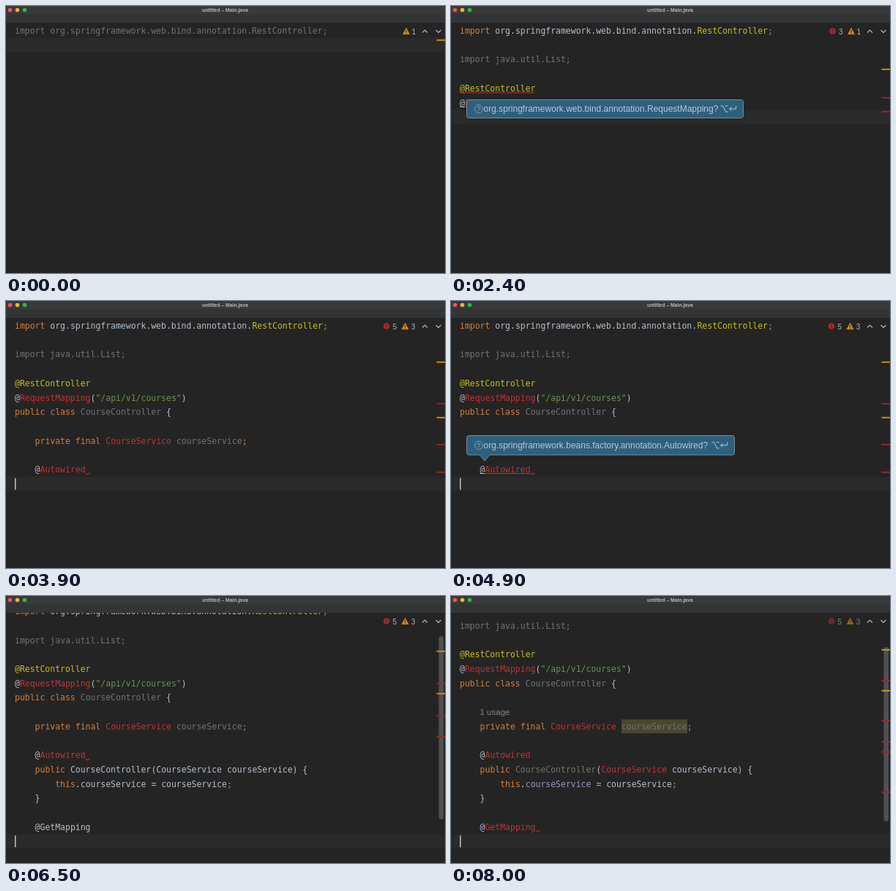
Animation of 600 by 366 pixels, one loop 8.1 s. Source, as an HTML page with a canvas:

```html
<!DOCTYPE html>
<html lang="en">
<head>
<meta charset="utf-8">
<title>Editor</title>
<style>
html, body { margin: 0; height: 100%; overflow: hidden; background: #242424; }
canvas { display: block; width: 600px; height: 366px; }
</style>
</head>
<body>
<canvas id="stage" width="600" height="366"></canvas>
<script>
const ctx = document.getElementById("stage").getContext("2d");
const LOOP = 8100, ROW = 19.7, CHAR = 6.903, LEFT = 12;
const MONO = '11.466px "DejaVu Sans Mono", monospace';
const sans = (size, weight = "") => `${weight} ${size}px "Liberation Sans", Arial, sans-serif`;
const RED = "#c53232", AMBER = "#c98a16", YELLOW = "#b8a022", DARK_RED = "#952a28";
const INK = { w: "#b3bfcc", o: "#d0803c", y: "#c5bf22", g: "#6a9155", r: RED, d: "#737373", p: "#a492bd" };

// Start of each editor state: a paste, then the analysis that follows it.
const STARTS = [0, 700, 1100, 3000, 3600, 6300, 7000, 8000];
const CARET_ROW = [1, 6, 6, 11, 11, 16, 17, 17];
const COUNTS = [[0, 1], [0, 1], [3, 1], [3, 1], [5, 3], [5, 3], [5, 3], [5, 3]];
const MARKS = [
  { a: [46] },
  { a: [86] },
  { a: [86], r: [125, 144] },
  { a: [83], r: [121, 140] },
  { a: [83, 159], r: [140, 196, 234] },
  { a: [75, 133], r: [119, 163, 192] },
  { y: [73, 129], r: [115, 170, 199, 213, 268] }
];
MARKS[7] = MARKS[6];
const MARK_INK = { a: AMBER, y: YELLOW, r: DARK_RED };

// "~" starts a token; the next letter is its colour.
function codeRows(state) {
  const late = (from, then, before = "w") => "~" + (state >= from ? then : before);
  const rows = [state < 2
    ? "~dimport org.springframework.web.bind.annotation.RestController;"
    : "~oimport ~worg.springframework.web.bind.annotation.~yRestController~o;"];
  if (state >= 1) rows.push("", "~dimport java.util.List;", "", "~y@RestController",
    `~w@${late(2, "r")}RequestMapping~w(~g"/api/v1/courses"~w)`);
  if (state >= 3) {
    rows.push(`~opublic class ${late(4, "d")}CourseController ~w{`, "");
    if (state >= 6) rows.push("");
    rows.push(`    ~oprivate final ${late(4, "r")}CourseService ${late(4, "d")}courseService~o;`, "",
      `    ~w@${late(4, "r")}Autowired`);
  }
  if (state >= 5) rows.push(
    `    ~opublic ${late(6, "d")}CourseController~w(${late(6, "r")}CourseService ~wcourseService) {`,
    `        ~othis~w.${late(7, "p")}courseService ~w= courseService~o;`,
    "    ~w}", "", `    ~w@${late(6, "r")}GetMapping`);
  return rows;
}

function text(str, x, y, font, color) {
  ctx.font = font;
  ctx.fillStyle = color;
  ctx.fillText(str, x, y);
}

function rect(x, y, w, h, color) {
  ctx.fillStyle = color;
  ctx.fillRect(x, y, w, h);
}

function disc(x, y, r, color) {
  ctx.fillStyle = color;
  ctx.beginPath();
  ctx.arc(x, y, r, 0, 7);
  ctx.fill();
}

function stroke(path, color, width = 1) {
  ctx.strokeStyle = color;
  ctx.lineWidth = width;
  ctx.stroke(new Path2D(path));
}

function drawCode(str, y) {
  let col = 0;
  str.split("~").forEach((part, i) => {
    const token = i ? part.slice(1) : part;
    text(token, LEFT + col * CHAR, y + 4, MONO, i ? INK[part[0]] : INK.w);
    col += token.length;
  });
}

function squiggle(col, length, y) {
  const x = LEFT + col * CHAR;
  let path = `M${x} ${y + 4.5}`;
  for (let d = 2, down = true; d <= length; d += 2, down = !down) path += `l2 ${down ? 2.6 : -2.6}`;
  stroke(path, RED);
}

function popup(label, y, w, h, pointer) {
  const x = 21.5, b = y + h, r = x + w, mid = y + h / 2;
  const tip = pointer ? `H53L46 ${b + 8}L39 ${b}` : "";
  const shape = `M${x + 3} ${y}H${r - 3}q3 0 3 3V${b - 3}q0 3 -3 3${tip}H${x + 3}q-3 0 -3 -3V${y + 3}q0 -3 3 -3z`;
  ctx.fillStyle = "#2d607d";
  ctx.fill(new Path2D(shape));
  stroke(shape, "#748b97");
  ctx.strokeStyle = "#94a9b5";
  ctx.lineWidth = 0.8;
  ctx.beginPath();
  ctx.arc(38, mid, 5.5, 0, 7);
  ctx.stroke();
  text("?", 35.5, mid + 3.3, sans(9), "#9fb2bc");
  text(label, 44.5, mid + 4, sans(12), "#bac8d0");
  const k = r - 31;
  stroke(`M${k} ${mid - 4}h3l4 8h3M${k + 6} ${mid - 4}h4` +
    `M${k + 21} ${mid - 4}v4h-9m3 -2.5l-3 2.5l3 2.5`, "#bac8d0");
}

function drawStatus(state) {
  const [errors, warnings] = COUNTS[state];
  const shift = state >= 4 ? -1.5 : 0;
  ctx.globalAlpha = state >= 6 ? 0.65 : 1;
  if (errors) {
    disc(521.5 + shift, 34.5, 4.3, "#a32a2a");
    rect(521 + shift, 32, 1, 3, "#262626");
    rect(521 + shift, 36, 1, 1, "#262626");
    text(errors, 530 + shift, 38.5, sans(10), "#b5b5b5");
  }
  ctx.fillStyle = AMBER;
  ctx.fill(new Path2D(`M${547 + shift} 29.5l5 9.5h-10z`));
  rect(546.5 + shift, 33, 1, 3, "#262626");
  rect(546.5 + shift, 37, 1, 1, "#262626");
  text(warnings, 554.5 + shift / 2, 38.5, sans(10), "#b5b5b5");
  ctx.globalAlpha = 1;
  stroke("M569 36.5l3.5 -3.5l3.5 3.5M587.5 33l3.5 3.5l3.5 -3.5", "#b8b8b8", 1.2);
}

function drawTitleBar() {
  rect(0, 0, 600, 23, "#323436");
  rect(0, 0, 600, 11, "#38393b");
  ["#f2544d", "#f0b52e", "#2bbd3f"].forEach((color, i) => disc(5.5 + i * 10, 5.5, 2.8, color));
  text("untitled – Main.java", 268, 8, sans(6.8, "bold"), "#b9b9b9");
}

function draw(t) {
  const state = STARTS.findLastIndex(start => t >= start);
  const ease = 1 - (1 - Math.min(1, Math.max(0, (t - 6300) / 200))) ** 3;
  const scroll = 12.9 * ease + (state >= 6 ? ROW : 0);
  const rowY = i => 34 + ROW * i - scroll;
  const caretY = rowY(CARET_ROW[state]);

  rect(0, 0, 600, 366, "#242424");
  rect(0, caretY - 10, 600, ROW, "#2a2a2a");
  if (state === 7) rect(233, rowY(9) - 9.5, 90, 19, "#4a4630");
  codeRows(state).forEach((row, i) => drawCode(row, rowY(i)));
  if (state >= 6) text("1 usage", 39.5, rowY(8) + 4, sans(11.5), "#858585");

  if (state === 2 || state === 3) {
    squiggle(0, 103, rowY(4));
    squiggle(34, 6, rowY(5));
  }
  if (state === 4 || state === 5) squiggle(14, 6, rowY(10));
  if (state >= 6) squiggle(15, 6, rowY(16));
  if (t >= 1300 && t < 3000) {
    rect(12, rowY(5) + 5, 7, 1, INK.w);
    rect(19, rowY(5) + 5, 97, 1, RED);
  }
  const hint2 = t >= 4300 && t < 5700;
  if (hint2) {
    rect(39.5, rowY(10) + 5, 7, 1, INK.w);
    rect(46.5, rowY(10) + 5, 62, 1, RED);
  }
  if ((t >= 700 && t < 1900) || t >= 3000) rect(12, caretY - 8, 1.5, 16, "#c3c3c3");

  if (state >= 5) {
    ctx.fillStyle = "#505050";
    ctx.beginPath();
    ctx.roundRect(591.5, state >= 6 ? 70 : 55, 6.5, state >= 6 ? 239 : 251, 3);
    ctx.fill();
  }
  for (const [key, ys] of Object.entries(MARKS[state]))
    for (const y of ys) rect(588.5, y - 0.2, 11.5, 2, MARK_INK[key]);

  if (t >= 1600 && t < 3000)
    popup("org.springframework.web.bind.annotation.RequestMapping?", 128.5, 378, 25);
  if (hint2)
    popup("org.springframework.beans.factory.annotation.Autowired?", 184.5, 366, 26.5, true);

  drawStatus(state);
  drawTitleBar();
  const mouse = t >= 1200 && t < 1700 ? [349, 250.5] : t >= 3000 && t < 3500 ? [318.5, 235] : null;
  if (mouse) stroke(`M${mouse[0]} ${mouse[1] - 3}v6m-1.5 .5h3m-3 -7h3`, "#a8a8a8", 0.9);
}

function tick() {
  draw(performance.now() % LOOP);
  requestAnimationFrame(tick);
}
tick();
</script>
</body>
</html>
```
